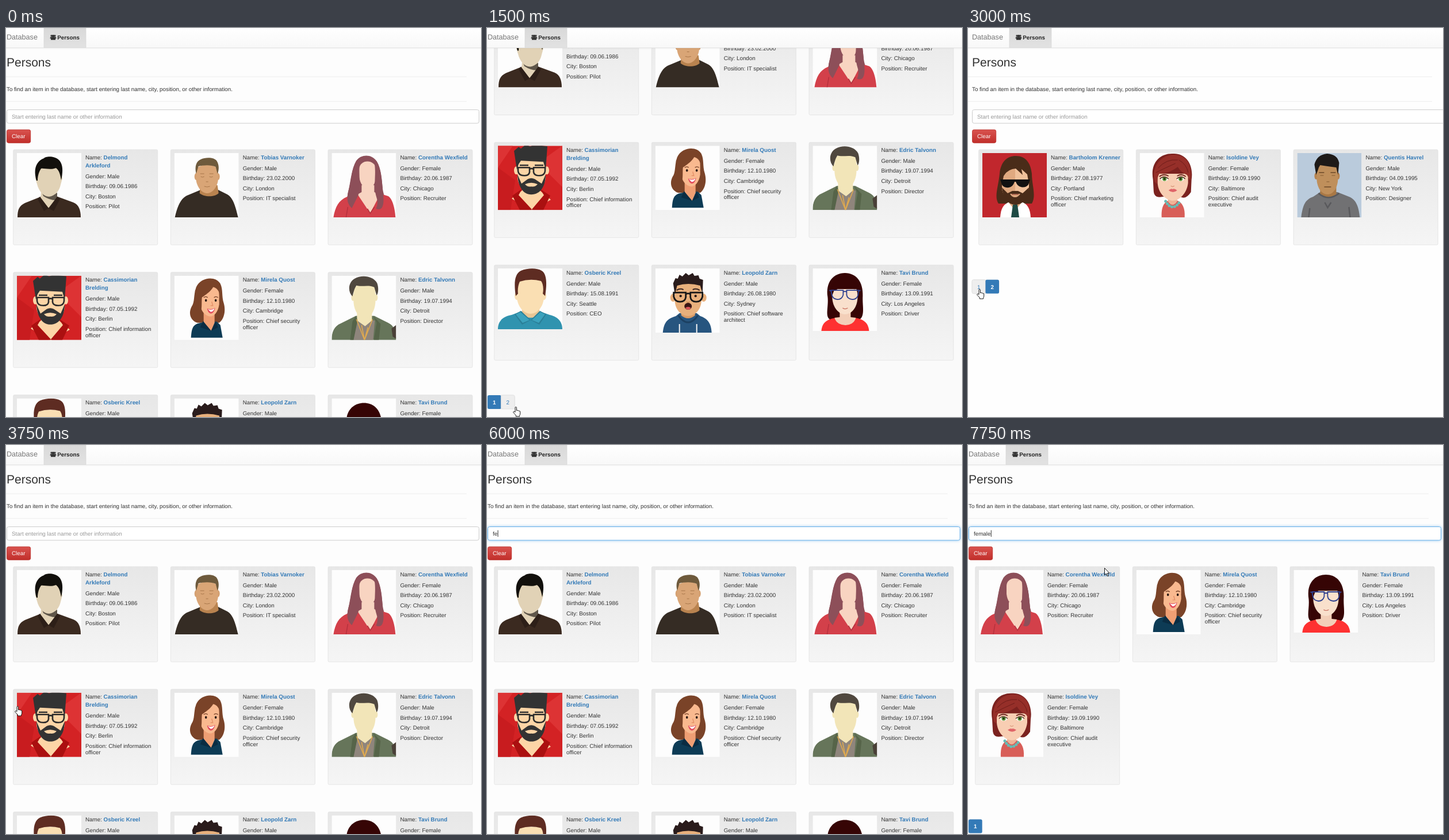
An HTML page that plays this animation: 826 px wide and 678 px high, repeating every 8000 ms.

```html
<!DOCTYPE html>
<html lang="en">
<head>
<meta charset="utf-8">
<title>Persons</title>
<style>
  html, body { margin: 0; width: 826px; height: 678px; overflow: hidden; }
  svg { display: block; }
  text { font: 9.8px "Liberation Sans", Arial, sans-serif; fill: #333; white-space: pre; text-rendering: geometricPrecision; }
  .bold { font-weight: bold; }
  .link { font-weight: bold; fill: #337ab7; }
  .focus { stroke: #66afe9; filter: drop-shadow(0 0 2.5px rgba(102, 175, 233, .65)); }
</style>
</head>
<body>
<svg id="stage" width="826" height="678"></svg>
<script>
const stage = document.getElementById('stage');
const LOOP = 8000;

// Drawing helpers
const shape = (fill, d) => `<path fill="${fill}" d="${d}"/>`;
const line = (color, width, d) => `<path fill="none" stroke="${color}" stroke-width="${width}" d="${d}"/>`;
const oval = (fill, x, y, rx, ry = rx) => `<ellipse fill="${fill}" cx="${x}" cy="${y}" rx="${rx}" ry="${ry}"/>`;
const rect = (x, y, w, h, fill, extra = '') => `<rect x="${x}" y="${y}" width="${w}" height="${h}" fill="${fill}" ${extra}/>`;
const text = (x, y, content, extra = '') => `<text x="${x}" y="${y}" ${extra}>${content}</text>`;
const gradient = (id, top, bottom) => `<linearGradient id="${id}" x2="0" y2="1"><stop stop-color="${top}"/><stop offset="1" stop-color="${bottom}"/></linearGradient>`;

const defs = '<defs>' + gradient('nav', '#fff', '#f8f8f8') + gradient('tab', '#d9d9d9', '#e2e2e2') +
  gradient('well', '#e7e7e7', '#f5f5f5') + gradient('danger', '#d9534f', '#c12e2a') + '</defs>';

// Portraits on a 112 x 112 field
const portraits = {
  pilot:
    shape('#3b2a20', 'M1 112C1 98 4 92 14 87L44 75H68L98 86C108 90 111 100 111 112Z') +
    shape('#e1d2b6', 'M42 68L41 78L55 96L69 80V66Z') +
    shape('#5f564a', 'M44 70Q56 78 70 69V82Q58 83 46 75Z') +
    shape('#2d1f18', 'M40 76L55 96L47 101L36 80ZM70 76L55 96L64 101L75 80Z') +
    shape('#e1d2b6', 'M34 32L32 44L35 54C38 66 46 76 56 76C66 75 74 66 76 55L79 44L76 28C66 18 42 18 34 32Z') +
    shape('#12100c', 'M34 48C29 32 31 15 47 9C50 5 70 4 76 16C81 25 79 38 77 47C75 37 74 31 68 26C58 30 47 26 42 27C38 33 36 40 36 48Z'),
  specialist:
    shape('#352c24', 'M1 112C6 90 12 79 22 74L46 64H76L92 72C103 78 107 96 111 112Z') +
    shape('#b9834f', 'M45 56L44 70C52 77 70 77 77 70L75 56Z') +
    oval('#d4a071', 38, 41, 3, 6) + oval('#d4a071', 76, 41, 3, 6) +
    shape('#d9a576', 'M38 28V48C40 60 48 70 57 70C66 70 74 60 76 48V28C70 18 44 18 38 28Z') +
    shape('#6e5a3c', 'M38 36C35 24 38 14 46 11C54 7 70 7 74 14C78 20 78 30 75 36L72 24C64 20 50 21 42 23Z') +
    line('#a8764a', 1, 'M45 36H52M61 36H68M46 41Q49 43 52 41M61 41Q64 43 67 41M52 58Q57 60 62 58M55 50H59'),
  recruiter:
    shape('#8d4f59', 'M43 13C52 1 70 2 78 14C87 29 87 48 89 66C94 80 92 96 82 100L74 84H44L36 98C26 90 26 78 29 66C33 50 34 28 43 13Z') +
    shape('#d3404a', 'M3 112C6 94 12 82 27 76L46 70L66 104L82 70L98 75C107 80 110 100 111 112Z') +
    shape('#f8d4c1', 'M52 56H74V68L84 72L67 105L45 72L52 68Z') +
    shape('#f8d4c1', 'M48 28C48 10 76 10 77 28V42C76 54 69 63 63 63C56 62 49 53 48 42Z') +
    shape('#8d4f59', 'M50 14C44 30 52 50 46 74L35 96C26 88 26 78 29 66C34 50 34 28 43 13ZM74 16C78 36 72 56 77 74Q82 88 77 97Q94 104 89 66C87 48 86 26 78 14Z') +
    line('#b5303d', 1.5, 'M25 112L28 94M62 97L67 105L74 94'),
  officer:
    rect(0, 0, 112, 112, '#d32224') + shape('#dd3334', 'M0 0H26L0 38ZM112 0V72L70 30Z') +
    shape('#c81c1f', 'M0 38L30 60L22 112H0Z') +
    shape('#fdd5a6', 'M42 66H73V78L92 94L60 112H56L24 92L42 78Z') +
    shape('#ab1010', 'M25 87L42 75L36 86L60 112H38ZM91 87L73 75L80 86L58 112H79Z') +
    oval('#fdd5a6', 32, 43, 4, 7) + oval('#fdd5a6', 85, 43, 4, 7) +
    shape('#fdd5a6', 'M34 20H83V55C82 68 74 80 58 80C43 80 35 68 34 55Z') +
    shape('#333', 'M33 42L28 9L36 2L40 5L48 -2L56 1L64 -2L86 1L83 42L79 28L40 26L36 32Z') +
    line('#333', 2.6, 'M38 34H53M64 34H79') +
    line('#2b2b2b', 2.6, 'M35 38H55V46Q54 52 46 52Q36 52 35 44ZM62 38H82V44Q81 52 72 52Q63 52 62 46ZM55 41Q58 38 62 41') +
    shape('#333', 'M34 50L41 66L52 58Q58 55 64 58L76 66L83 50C83 70 74 85 58 85C43 85 35 70 34 50Z') +
    shape('#fdd5a6', 'M47 67Q58 62 69 67Q65 72 58 71Q51 72 47 67Z'),
  security:
    shape('#7a4328', 'M38 20C46 2 72 0 80 14C85 24 82 36 86 48C90 62 86 76 78 82H40C28 78 24 66 30 54C36 46 33 34 38 20Z') +
    shape('#0d3b55', 'M29 108C30 92 32 86 42 83L56 80L74 80L80 86L84 108Z') +
    shape('#ef9f74', 'M51 62H70V82L64 96L51 82Z') +
    shape('#0a2c42', 'M50 79L64 96L45 90ZM72 80L64 96L76 90Z') +
    shape('#f9b98f', 'M45 32C48 16 74 14 78 30V50C76 64 69 71 62 71C53 70 46 61 45 50Z') +
    shape('#7a4328', 'M72 7C70 24 56 32 48 38C47 50 49 60 44 66L38 60L36 26L50 8ZM72 8Q80 26 78 44L84 46L80 14Z') +
    oval('#2c1a14', 55, 43, 1.8, 2.3) + oval('#2c1a14', 72, 43, 1.8, 2.3) +
    line('#6b3820', 1.3, 'M51 38Q55 35 58 38M69 38Q72 35 76 38') + line('#e08a62', 1.2, 'M65 45L67 52H63') +
    shape('#e34d5d', 'M57 57Q64 60 71 56Q69 66 63 66Q58 64 57 57Z') + shape('#fff', 'M58 58Q64 61 70 57Q68 63 63 63Z'),
  director:
    shape('#66755a', 'M0 112C0 98 4 88 16 83L42 70H74L98 82C109 87 112 98 112 112Z') +
    shape('#8f857c', 'M41 78H75L72 112H34Z') + shape('#f2e5b8', 'M44 64H70V78L58 88L44 78Z') +
    shape('#566449', 'M42 70L36 80L32 112H38L45 78ZM72 70L78 82L73 112H82L85 84Z') +
    shape('#4a4038', 'M104 92L112 86V110L106 106Z') +
    line('#dfa94f', 1.6, 'M43 76L57 112L71 76M52 86L57 112L63 90') +
    oval('#f2e5b8', 37, 38, 3, 6) + oval('#f2e5b8', 77, 38, 3, 6) +
    shape('#f2e5b8', 'M38 22V46C39 62 48 74 57 74C67 74 75 62 76 46V20C66 12 46 12 38 22Z') +
    shape('#50483f', 'M36 36C28 28 28 12 40 5C52 -2 72 0 79 13C82 22 81 31 78 34L74 20C64 15 52 20 43 17C39 23 38 29 36 36Z'),
  chief:
    shape('#3093af', 'M0 106C0 92 8 84 24 81L40 75H73L90 81C106 85 112 94 112 106Z') +
    shape('#e9c695', 'M42 66H72V80Q57 92 42 80Z') +
    shape('#2a7f98', 'M40 74L57 90L42 98L29 80ZM73 74L57 90L72 98L84 80Z') + shape('#3ba2bd', 'M39 76L55 90L43 95L31 80ZM74 76L59 90L71 95L82 80Z') +
    oval('#fadfb3', 33, 48, 4, 7) + oval('#fadfb3', 80, 48, 4, 7) +
    shape('#fadfb3', 'M33 20H80V50C79 68 68 79 57 79C45 79 34 67 33 50Z') +
    shape('#5e2c22', 'M31 48C28 28 28 10 40 4C52 -1 68 -1 76 4C86 10 85 30 82 48L78 44C80 34 78 26 75 22Q56 17 38 23C35 29 34 38 35 44Z'),
  architect:
    shape('#27557f', 'M13 112C15 94 20 88 36 83L42 78H72L78 83C92 88 97 96 98 112Z') +
    shape('#d99b66', 'M45 70H69V82Q57 92 45 82Z') + line('#1c4062', 3, 'M40 82Q57 106 74 82') +
    line('#f5f5f5', 2, 'M42 97V112M72 97V112') +
    oval('#e8b07c', 31, 51, 5, 7) + oval('#e8b07c', 84, 51, 5, 7) +
    shape('#e8b07c', 'M34 24H80V58C79 72 69 83 57 83C45 83 35 72 34 58Z') +
    shape('#2a1c1c', 'M34 45L31 26L35 17L39 18L42 11L47 14L53 8L58 12L65 8L68 13L75 12L77 18L83 20L82 44L78 30Q57 24 38 30Z') +
    line('#171717', 2.8, 'M32 42H53V50Q52 58 43 58Q34 58 32 49ZM61 42H82V49Q80 58 71 58Q62 58 61 50ZM53 45Q57 42 61 45') +
    oval('#271816', 44, 48, 2.2) + oval('#271816', 70, 48, 2.2) + line('#3a2420', 2, 'M37 38Q43 34 49 37M65 37Q71 34 77 38') +
    oval('#3a1614', 57, 66, 6.5, 6) + shape('#e0575b', 'M52 69Q57 65 62 69Q57 75 52 69Z') + line('#c98a55', 1.5, 'M54 58Q57 60 60 58'),
  driver:
    shape('#360505', 'M26 50C22 24 36 8 56 8C76 8 88 24 87 48C86 66 92 84 80 90H32C20 86 28 68 26 50Z') +
    shape('#fe3131', 'M15 109C16 95 24 88 42 86H72C90 88 97 96 98 109Z') +
    shape('#f3cfb8', 'M47 70H66V85L75 86Q72 98 57 99Q41 98 38 86L47 85Z') +
    shape('#f9e0cc', 'M34 36H78V52C77 68 68 80 56 80C45 80 35 68 34 52Z') +
    shape('#360505', 'M32 52C30 28 40 20 54 20C72 18 82 32 80 52L76 36Q62 37 51 29Q46 36 37 39Z') +
    line('#2c3f8f', 1.8, 'M32 38H53V46Q51 54 43 54Q34 53 33 45ZM59 38H80L79 46Q77 54 69 54Q60 53 59 46ZM53 41Q56 39 59 41M33 40L29 38M79 40L83 38') +
    line('#c9705f', 1.2, 'M52 69Q56 72 61 69'),
  marketing:
    rect(0, 0, 112, 112, '#c1272d') +
    shape('#4a2c19', 'M30 36C32 14 44 5 58 5C76 5 84 18 86 36C86 56 94 74 86 88H28C20 76 28 58 30 36Z') +
    shape('#fff', 'M31 112C32 96 37 89 47 85H68C79 89 83 97 84 112Z') +
    shape('#e0a980', 'M47 74H67V88L57 100L47 88Z') + shape('#1e4a44', 'M53 90H61L64 112H50Z') +
    shape('#f0c19b', 'M34 34Q57 18 81 34V60C79 76 68 84 57 84C46 84 35 76 34 60Z') +
    shape('#e0a980', 'M34 34Q45 25 57 26V84C46 84 35 76 34 60Z') +
    shape('#4a2c19', 'M33 60L32 28Q46 14 62 18Q76 17 83 35L82 60L78 37L68 28L70 38L58 27Q44 28 37 40Z') +
    shape('#111', 'M31 46H83L80 55Q75 61 67 59Q61 58 58 50H56Q53 59 46 60Q37 61 34 55Z') +
    shape('#4a2c19', 'M34 60L44 70L52 66H62L70 70L81 60C80 80 70 90 57 90C45 90 36 79 34 60Z') +
    shape('#e0a980', 'M48 71H66Q62 77 57 77Q51 77 48 71Z') + line('#9a4a3c', 1.4, 'M51 72H63'),
  audit:
    shape('#7b221f', 'M23 46C18 18 34 0 58 1C80 0 94 20 90 46L89 68Q80 82 70 76H40Q24 80 24 64Z') +
    shape('#d85e58', 'M38 112C37 94 42 86 50 83H66C74 87 79 95 78 112Z') +
    shape('#efb497', 'M49 72H65V84Q57 96 49 84Z') +
    shape('#f8ceb3', 'M31 36H84V52C82 70 69 83 57 83C45 82 32 70 31 52Z') +
    shape('#962f29', 'M26 50C20 24 36 4 58 3C80 2 92 18 88 48L82 38Q72 34 66 24C56 32 44 36 34 36Q30 42 30 54Z') +
    line('#6e1c19', 1, 'M32 26Q46 10 66 12M28 34Q44 26 62 18M68 12Q82 20 84 34') +
    line('#702620', 1.8, 'M34 41Q41 35 50 40M65 40Q73 35 80 41') +
    oval('#fff', 43, 45, 6.5, 4) + oval('#fff', 71, 45, 6.5, 4) + oval('#619b3e', 43, 45, 3.7) + oval('#619b3e', 71, 45, 3.7) +
    oval('#18220f', 43, 45, 1.7) + oval('#18220f', 71, 45, 1.7) + line('#412018', 1.2, 'M35 45Q42 38 50 45M64 45Q72 38 79 45') +
    line('#d99878', 1.2, 'M54 57Q57 60 60 57') + shape('#df6468', 'M50 65Q55 61 57 63Q60 61 65 65Q58 71 50 65Z') +
    '<path fill="none" stroke="#66bdb5" stroke-width="5" stroke-dasharray="0 5" stroke-linecap="round" d="M45 84Q57 104 70 84"/>',
  designer:
    rect(0, 0, 112, 112, '#bacbdc') +
    shape('#717173', 'M7 112C10 90 14 81 28 76L40 68H70L90 76C103 81 107 94 109 112Z') +
    shape('#a97845', 'M40 50H68V72Q54 82 40 72Z') + line('#59595c', 2.5, 'M37 70Q54 85 73 70M48 86L53 95L59 86M20 112L22 96M92 112L90 94') +
    oval('#b78450', 33, 40, 3, 6) + oval('#b78450', 71, 40, 3, 6) +
    shape('#bf8f5b', 'M34 18H71V46C70 62 62 72 53 72C43 72 35 62 34 46Z') +
    shape('#1e1a18', 'M33 38L30 20Q34 3 52 1Q70 2 73 17L71 38L68 25Q52 23 40 21Q37 25 36 30Z') +
    line('#6b4828', 1.5, 'M38 34H47M58 34H67M47 59H59') + line('#855c32', 1.2, 'M40 39H46M60 39H66M51 50H56')
};

// name lines, gender, birthday, city, position lines, portrait, portrait height
const people = [
  ['Delmond|Arkleford', 'Male', '09.06.1986', 'Boston', 'Pilot', 'pilot'],
  ['Tobias Varnoker', 'Male', '23.02.2000', 'London', 'IT specialist', 'specialist'],
  ['Corentha Wexfield', 'Female', '20.06.1987', 'Chicago', 'Recruiter', 'recruiter'],
  ['Cassimorian|Brelding', 'Male', '07.05.1992', 'Berlin', 'Chief information|officer', 'officer'],
  ['Mirela Quost', 'Female', '12.10.1980', 'Cambridge', 'Chief security|officer', 'security'],
  ['Edric Talvonn', 'Male', '19.07.1994', 'Detroit', 'Director', 'director'],
  ['Osberic Kreel', 'Male', '15.08.1991', 'Seattle', 'CEO', 'chief', 106],
  ['Leopold Zarn', 'Male', '26.08.1980', 'Sydney', 'Chief software|architect', 'architect'],
  ['Tavi Brund', 'Female', '13.09.1991', 'Los Angeles', 'Driver', 'driver', 109],
  ['Bartholom Krenner', 'Male', '27.08.1977', 'Portland', 'Chief marketing|officer', 'marketing'],
  ['Isoldine Vey', 'Female', '19.09.1990', 'Baltimore', 'Chief audit|executive', 'audit'],
  ['Quentis Havrel', 'Male', '04.09.1995', 'New York', 'Designer', 'designer']
];

function card([name, gender, birthday, city, position, portrait, height = 112], i) {
  const [first, last] = name.split('|');
  const [job, rest = ''] = position.split('|');
  const y = last ? 261.5 : 247.5;
  return `<g transform="translate(${(i % 3) * 273.7} ${Math.floor(i / 3) * 213.8})">` +
    rect(12.7, 212, 251, 166, 'url(#well)', 'stroke="#e1e1e1" stroke-width=".8" rx="2"') +
    `<svg x="19" y="218" width="112" height="${height}">${rect(0, 0, 112, 112, '#fdfdfd')}${portraits[portrait]}</svg>` +
    text(138, 228.7, `Name: <tspan class="link">${first}</tspan>`) +
    (last ? text(138, 242.7, last, 'class="link"') : '') +
    [`Gender: ${gender}`, `Birthday: ${birthday}`, `City: ${city}`, `Position: ${job}`]
      .map((row, k) => text(138, y + k * 17.6, row)).join('') +
    text(138, y + 63.4, rest) + '</g>';
}

function pagination(count, active, hover, y) {
  let out = rect(1.2, y, count * 23.4, 23.4, '#fff', 'rx="3" stroke="#ddd" stroke-width=".8"');
  for (let n = 1; n <= count; n++) {
    const x = 1 + (n - 1) * 23.4, on = n === active;
    if (on || n === hover) out += rect(x, y - .3, 23.6, 24, on ? '#337ab7' : '#eee', `rx="2.5" ${on ? '' : 'stroke="#ddd" stroke-width=".8"'}`);
    out += text(x + 11.8, y + 15.4, n, `text-anchor="middle" ${on ? 'class="bold" style="fill:#fff"' : 'style="fill:#337ab7"'}`);
  }
  return out;
}

const cursors = {
  arrow: '<path fill="#fff" stroke="#000" stroke-width=".9" d="M.5 .5V12.6L3.3 10L5.3 14.6L7.2 13.8L5.3 9.3H9Z"/>',
  hand: '<path fill="#fff" stroke="#000" stroke-width=".9" d="M4 9.5V1.7a1.2 1.2 0 0 1 2.4 0V6.6q2-1 2.4.4q1.8-.6 2.2.7q1.8-.4 1.7 1.2V12q0 2-1.1 3.3V17H5.3V15L1 10.4q-.8-1.6.6-1.9Q3 8.4 4 9.5Z"/>',
  beam: line('#ddd', 1, 'M.5 0V11')
};

// start time, cursor, x, y
const moves = [
  [0], [250, 'arrow', 290, 248], [500, 'arrow', 215, 301], [750, 'arrow', 241, 396],
  [1000, 'arrow', 52, 544], [1250, 'arrow', 11, 660], [1500, 'hand', 45, 660],
  [2500, 'arrow', 63, 501], [2750, 'hand', 21, 459], [3000, 'hand', 15, 455],
  [4000, 'arrow', 68, 302], [4250, 'arrow', 92, 168], [4500, 'beam', 93, 149],
  [6000], [7750, 'arrow', 237, 214]
];

function draw(t) {
  const [, cursor, cx, cy] = moves.findLast(m => m[0] <= t);
  const second = t >= 2000 && t < 3750;
  const shift = second ? 6 : 0;
  const scroll = t >= 2000 || t < 750 ? 0 : t < 1000 ? 212.5 : 226.5;
  const focused = t >= 4750;
  const caret = focused && !(t >= 5250 && t < 5750) && !(t >= 7250 && t < 7750);
  const query = t < 6000 ? '' : t < 6250 ? 'fe' : t < 6500 ? 'fema' : 'female';
  const filtered = t >= 6250;
  const shown = filtered ? people.filter(p => p[1].toLowerCase().includes(query)) : second ? people.slice(9) : people.slice(0, 9);
  const hover = second && t >= 3000 ? 1 : t >= 1500 && t < 2000 ? 2 : 0;
  const background = scroll ? '#fafafa' : second ? '#fefefe' : '#fdfdfd';

  stage.innerHTML = defs + rect(0, 0, 826, 678, background) +
    `<g transform="translate(${shift} ${-scroll})">` +
      text(1, 66.5, 'Persons', 'style="font-size:21px"') +
      rect(-6, 84.5, 807, 1, '#eee') + rect(-6, 127.5, 807, 1, '#eee') +
      text(1, 110, 'To find an item in the database, start entering last name, city, position, or other information.') +
      rect(1.5, 142.5, 821, 23.5, '#fff', `rx="3" stroke="#ccc" ${focused ? 'class="focus"' : ''}`) +
      text(10, 157.8, query || 'Start entering last name or other information', query ? 'id="query"' : 'style="fill:#999"') +
      (caret ? rect(10.2, 148.5, .9, 11.5, '#222', 'id="caret"') : '') +
      rect(1.5, 177.3, 41.2, 23, 'url(#danger)', 'rx="3" stroke="#b92c28" stroke-width=".8"') +
      text(10, 192.2, 'Clear', 'style="fill:#fff"') +
      shown.map(card).join('') +
      pagination(filtered ? 1 : 2, second ? 2 : 1, hover, 225.3 + Math.ceil(shown.length / 3) * 213.8) +
    '</g>' +
    rect(0, 34, 826, 3, '#000', 'opacity=".025"') + rect(0, 0, 826, 34, 'url(#nav)') + rect(0, 34, 826, 1, '#e4e4e4') +
    `<g transform="translate(${shift} 0)">` +
      text(1, 20.4, 'Database', 'style="font-size:12.6px;fill:#777"') +
      rect(66, 0, 73, 34, 'url(#tab)', 'stroke="#d2d2d2" stroke-width=".6"') +
      oval('#444', 79, 13.4, 1.6) + oval('#444', 85, 13.4, 1.6) + oval('#333', 82, 14, 2.3) +
      shape('#444', 'M76.6 18.5Q76.5 15.3 78.5 15.3H85.5Q87.5 15.3 87.4 18.5Z') + shape('#333', 'M78 20.8Q77.8 16.5 80 16.5H84Q86.2 16.5 86 20.8Z') +
      text(89.3, 19.6, 'Persons', 'class="bold" style="fill:#222"') +
    '</g>' +
    (cursor ? `<g transform="translate(${cx} ${cy})">${cursors[cursor]}</g>` : '');

  const typed = document.getElementById('query');
  if (typed && caret) document.getElementById('caret').setAttribute('x', 10.4 + typed.getComputedTextLength());
}

// The picture changes only on quarter seconds
let last = -1;
function tick(now) {
  const t = Math.floor(now % LOOP / 250) * 250;
  if (t !== last) draw(last = t);
  requestAnimationFrame(tick);
}
draw(0);
requestAnimationFrame(tick);
</script>
</body>
</html>
```
